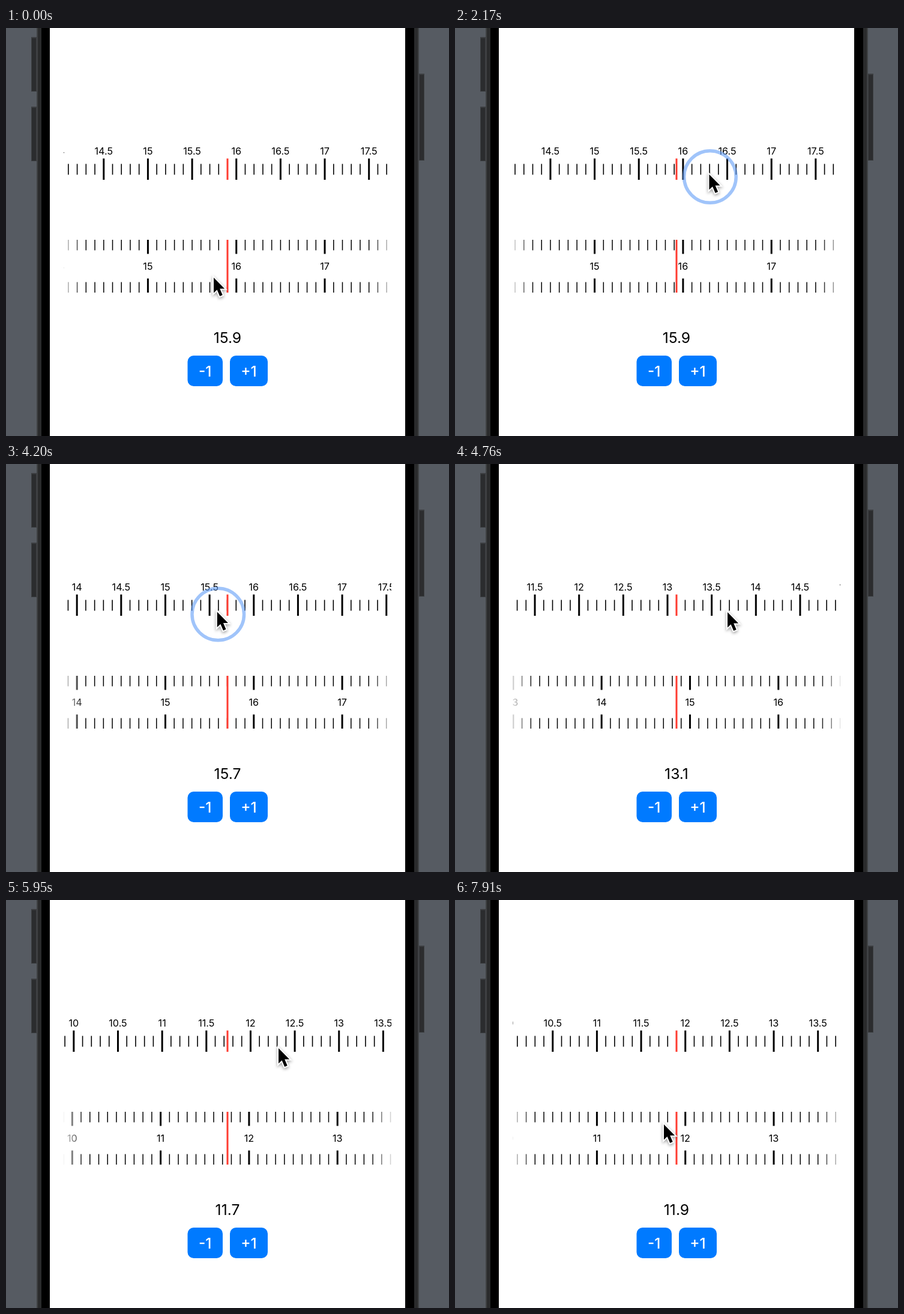
An HTML page with a canvas for the animation above (8 s loop, 738x680 px).

```html
<!DOCTYPE html>
<html lang="en">
<head>
<meta charset="utf-8">
<title>Ruler picker</title>
<style>
  html, body { margin: 0; width: 100%; height: 100%; overflow: hidden; background: #565b62; }
  canvas { display: block; }
</style>
</head>
<body>
<canvas id="stage" width="738" height="680"></canvas>
<script>
const c = document.getElementById('stage').getContext('2d');
const LOOP = 8000, STEP = 70, LAST = 7910;
const MID = 369, UNIT = 147.3, LEFT = 96, RIGHT = 642, SLOP = 15;
const RED = '#ff3b30', BLUE = '#007aff';

const smooth = u => u * u * (3 - 2 * u);
const easeIn = p => u => u ** p;
const easeOut = u => 1 - (1 - u) ** 2;
const clamp = u => Math.max(0, Math.min(1, u));

// Keys are [time, value, easing towards this key].
function at(keys, t) {
  const i = keys.findIndex(k => k[0] > t);
  if (i < 0) return keys[keys.length - 1][1];
  if (i === 0) return keys[0][1];
  const [t0, a] = keys[i - 1], [t1, b, ease = smooth] = keys[i];
  return a + (b - a) * ease((t - t0) / (t1 - t0));
}

const PRESS = 3780, RELEASE = 4350, REST = 11.6;
const cursorX = [[0, 346], [1260, 445], [1820, 445], [2450, 408], [3010, 408], [3640, 293],
  [PRESS, 293], [RELEASE, 454, easeIn(3.3)], [6160, 454], [6720, 436], [7210, 436], [7910, 348]];
const cursorY = [[0, 416], [1260, 244], [PRESS, 244], [RELEASE, 247], [6160, 247], [6720, 374]];
const early = [[1960, 15.9], [2590, 16]];
const late = [[7300, REST], [7840, 11.9]];
const catchUp = [[RELEASE, 15.01], [5320, 14.1, easeIn(2)], [6160, REST, easeOut]];
const holds = [[1820, 2450], [PRESS - 70, RELEASE], [7280, 7700]];

function topValue(t) {
  if (t < PRESS) return at(early, t);
  if (t < RELEASE) return 16 - Math.max(0, at(cursorX, t) - 293 - SLOP) / UNIT;
  if (t < 6500) return REST + 3.41 * Math.exp((RELEASE - t) / 500);
  return at(late, t);
}
const lowValue = t => t >= RELEASE && t < 6500 ? at(catchUp, t) : topValue(t);

function box(x, y, w, h, color) {
  c.fillStyle = color;
  c.fillRect(x, y, w, h);
}

function text(s, x, y, size, color = '#000', weight = 400) {
  c.font = `${weight} ${size}px Inter, "Liberation Sans", sans-serif`;
  c.textAlign = 'center';
  c.fillStyle = color;
  c.fillText(s, x, y);
}

function phone() {
  box(0, 0, 738, 680, '#565b62');
  for (const [x, y, h] of [[42, 15, 91], [42, 131, 91], [688, 76, 145]]) {
    box(x, y, 9, h, '#3c3e41');
    box(x + 1, y + 2, 7, h - 3, '#2b2c2e');
  }
  box(51, 0, 637, 680, '#3f4143');
  box(53, 0, 633, 680, '#2a2b2c');
  box(59, 0, 621, 680, '#000');
  box(73, 0, 592, 680, '#fff');
}

// Calls draw(x, tenths) for each tenth near the visible window.
function eachTick(value, draw) {
  c.save();
  c.beginPath();
  c.rect(LEFT, 180, RIGHT - LEFT, 280);
  c.clip();
  const mid = Math.round(value * 10);
  for (let n = mid - 21; n <= mid + 21; n++) draw(MID + (n / 10 - value) * UNIT, n);
  c.restore();
}

function tick(x, y, h, w) {
  box(x - w / 2, y, w, h, '#000');
}

function topRuler(value) {
  eachTick(value, (x, n) => {
    if (n % 5) return tick(x, 226.5, 18, 1.6);
    tick(x, 217.5, 35.5, 3);
    text(n / 10, x, 211, 16.2);
  });
  box(MID - 1.5, 217.5, 3, 35.5, RED);
}

function lowRuler(value) {
  eachTick(value, (x, n) => {
    const major = n % 10 === 0;
    const h = major ? 23.5 : 17.5, w = major ? 3 : 1.5;
    tick(x, 353, h, w);
    tick(x, 441 - h, h, w);
    if (major) text(n / 10, x, 402.8, 16.2);
  });
  for (const [edge, inner] of [[94, 131], [644, 607]]) {
    const fade = c.createLinearGradient(edge, 0, inner, 0);
    fade.addColorStop(0, 'rgba(255,255,255,.9)');
    fade.addColorStop(1, 'rgba(255,255,255,0)');
    box(Math.min(edge, inner), 350, 37, 95, fade);
  }
  box(MID - 1.5, 353, 3, 88, RED);
}

function button(x, w, label) {
  c.fillStyle = BLUE;
  c.beginPath();
  c.roundRect(x, 546, w, 51, 10);
  c.fill();
  text(label, x + w / 2, 580.7, 24.5, '#fff', 500);
}

function ring(x, y, alpha) {
  c.strokeStyle = `rgba(97,157,247,${0.6 * alpha})`;
  c.lineWidth = 5.5;
  c.beginPath();
  c.arc(x + 1.5, y + 4, 43.3, 0, 2 * Math.PI);
  c.stroke();
}

const arrow = new Path2D('M0 0V25.5L5.6 20.2L10.2 31L14.7 29.1L10.2 18.4H18.2Z');
function pointer(x, y) {
  c.save();
  c.translate(x, y);
  c.lineJoin = 'miter';
  c.lineWidth = 4;
  c.strokeStyle = '#fff';
  c.shadowColor = 'rgba(0,0,0,.4)';
  c.shadowBlur = 5;
  c.shadowOffsetY = 2;
  c.stroke(arrow);
  c.shadowColor = 'transparent';
  c.fillStyle = '#000';
  c.fill(arrow);
  c.restore();
}

function draw(t) {
  const value = topValue(t), x = at(cursorX, t), y = at(cursorY, t);
  phone();
  topRuler(value);
  lowRuler(lowValue(t));
  text(Math.round(value * 10) / 10, MID, 525, 24.7);
  button(302.5, 58.5, '-1');
  button(373, 63, '+1');
  for (const [on, off] of holds) {
    const alpha = Math.min(clamp((t - on) / 140), clamp((off + 70 - t) / 140));
    if (alpha > 0) ring(x, y, alpha);
  }
  pointer(x, y);
}

const start = performance.now();
function frame() {
  const t = (performance.now() - start) % LOOP;
  draw(Math.min(LAST, Math.floor(t / STEP) * STEP));
  requestAnimationFrame(frame);
}
frame();
</script>
</body>
</html>
```
